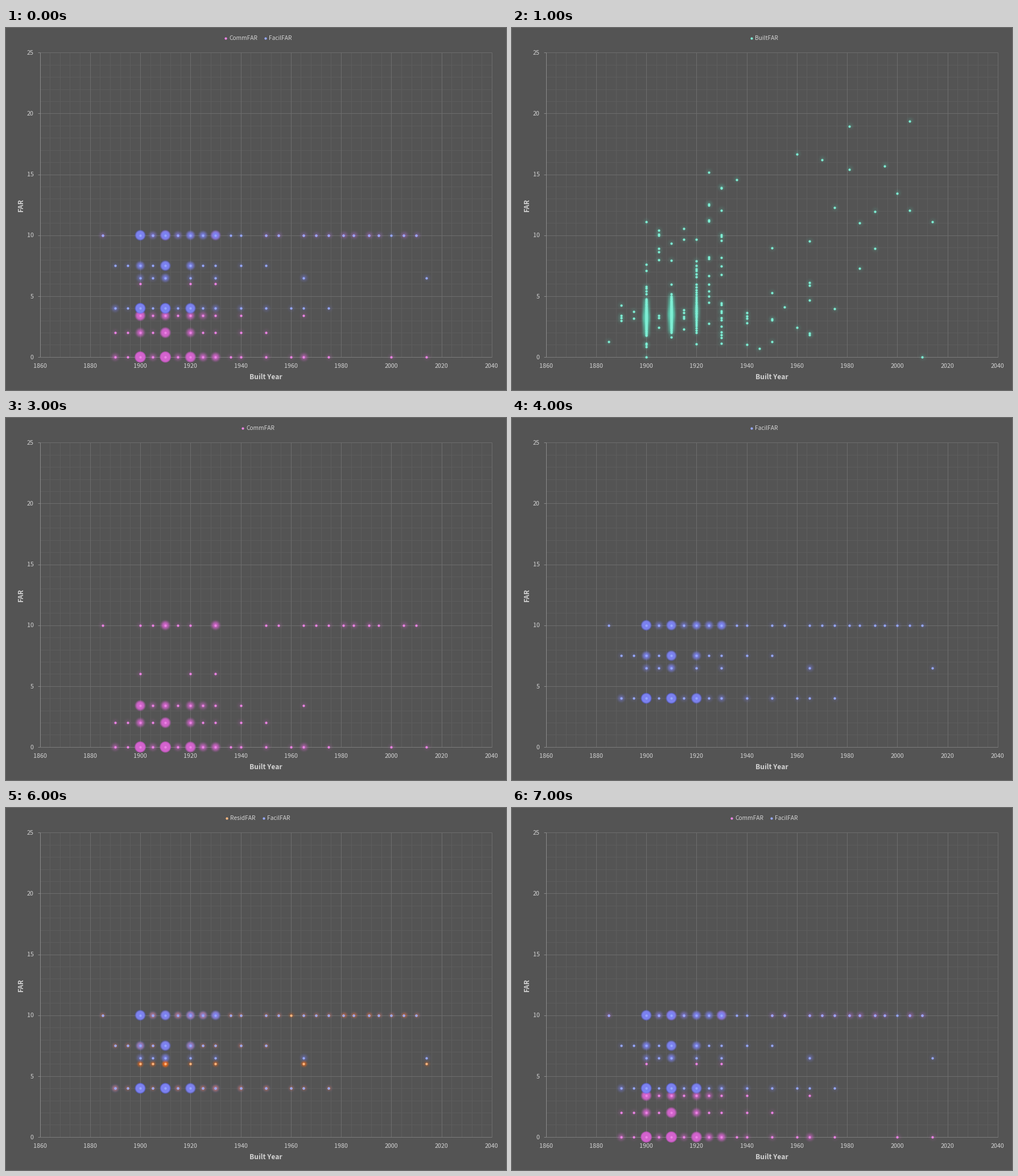
Recreate the animation shown at these times as a matplotlib script. Size 879 by 637 pixels, loop 8 s.

```python
import numpy as np
import matplotlib.pyplot as plt
from matplotlib.animation import FuncAnimation

W, H, DPI = 879, 637, 100
BACK, MINOR, MAJOR, AXIS, INK = "#545454", "#5d5d5d", "#6d6d6d", "#8a8a8a", "#d2d2d2"
plt.rcParams["font.family"] = ["Noto Sans CJK JP", "Liberation Sans"]


def px(year):
    return 59.5 + (year - 1860) * 4.413


def py(far):
    return 578.9 - far * 21.42


# Floor area ratio -> {year: number of lots}
LATE = {y: 1 for y in (1950, 1955, 1965, 1970, 1975, 1981, 1985, 1991, 1995, 2005, 2010)}
BUSY = {1981: 2, 1985: 2, 1991: 2, 2005: 2}

comm = {
    0: {1890: 4, 1895: 1, 1900: 150, 1905: 4, 1910: 150, 1915: 4, 1920: 70, 1925: 9, 1930: 13,
        1936: 1, 1940: 2, 1950: 2, 1960: 1, 1965: 5, 1975: 1, 2000: 1, 2014: 1},
    2: {1890: 1, 1895: 1, 1900: 12, 1905: 1, 1910: 50, 1920: 11, 1925: 1, 1930: 1, 1940: 1, 1950: 1},
    3.4: {1900: 40, 1905: 3, 1910: 15, 1915: 2, 1920: 10, 1925: 5, 1930: 2, 1940: 1, 1965: 1},
    6: {1900: 1, 1920: 1, 1930: 1},
    10: {1885: 1, 1900: 1, 1905: 1, 1910: 15, 1915: 1, 1920: 1, 1930: 12, **LATE, **BUSY},
}
facil = {
    4: {1890: 4, 1895: 1, 1900: 130, 1905: 1, 1910: 130, 1915: 2, 1920: 80, 1925: 2, 1930: 4,
        1940: 2, 1950: 2, 1960: 1, 1965: 1, 1975: 1},
    6.5: {1900: 4, 1905: 2, 1910: 10, 1920: 2, 1930: 2, 1965: 3, 2014: 1},
    7.5: {1890: 1, 1895: 1, 1900: 13, 1905: 1, 1910: 60, 1920: 13, 1925: 1, 1930: 1, 1940: 1, 1950: 1},
    10: {1885: 1, 1900: 80, 1905: 5, 1910: 50, 1915: 5, 1920: 16, 1925: 10, 1930: 22,
         1936: 1, 1940: 1, 2000: 1, **LATE},
}
resid = {
    4: {1890: 3, 1895: 1, 1900: 20, 1905: 1, 1910: 20, 1915: 2, 1920: 15, 1925: 2, 1930: 4,
        1940: 2, 1950: 2, 1960: 1, 1965: 1, 1975: 1},
    6: {1900: 3, 1905: 2, 1910: 7, 1920: 1, 1930: 2, 1965: 3, 2014: 1},
    7.5: {1890: 1, 1895: 1, 1900: 8, 1905: 1, 1910: 14, 1920: 7, 1925: 1, 1930: 1, 1940: 1, 1950: 1},
    10: {1885: 1, 1900: 16, 1905: 4, 1910: 16, 1915: 4, 1920: 12, 1925: 8, 1930: 6,
         1936: 1, 1940: 1, 1960: 1, 2000: 1, **LATE, **BUSY},
}

# Year -> built ratios
early = {
    1885: [1.25], 1890: [4.25, 3.4, 3.2, 3.0], 1895: [3.75, 3.15],
    1900: [11.1, 7.6, 7.1, 5.8, 5.65, 5.4, 5.2, 1.1, 1.0, 0.85, 0],
    1905: [10.42, 10.1, 10.0, 8.9, 8.65, 8.0, 3.4, 3.2, 2.4],
    1910: [9.35, 7.95, 5.95, 5.2, 1.65],
    1915: [10.55, 9.65, 3.85, 3.65, 3.3, 3.15, 2.3],
    1920: [9.65, 7.9, 7.5, 7.25, 7.1, 6.8, 6.57, 5.95, 5.75, 1.05],
    1925: [15.15, 12.55, 12.45, 11.25, 11.15, 8.2, 8.05, 6.65, 5.95, 5.4, 5.0, 4.5, 2.75],
    1930: [13.92, 13.88, 12.05, 10.05, 9.9, 9.55, 8.17, 7.48, 6.77, 4.45, 4.3, 3.8, 3.65,
           3.2, 3.05, 2.5, 2.05, 1.83, 1.6, 1.1],
}
late = {
    1936: [14.55], 1940: [3.65, 3.35, 3.15, 2.8, 1.0], 1945: [0.68],
    1950: [8.95, 5.28, 3.1, 3.05, 1.25], 1955: [4.12], 1960: [16.65, 2.4],
    1965: [9.5, 6.12, 5.9, 4.68, 1.95, 1.8], 1970: [16.2], 1975: [12.25, 3.95],
    1981: [18.93, 15.42], 1985: [11.0, 7.28], 1991: [11.95, 8.9], 1995: [15.7],
    2000: [13.43], 2005: [19.37, 12.02], 2010: [0], 2014: [11.1],
}


def column(year, mid, spread, n):
    u = np.linspace(-1, 1, n)
    return [(year, mid + spread * (0.55 * a + 0.45 * a ** 3), 1) for a in u]


def lots(table):
    return [(y, far, n) for far, row in table.items() for y, n in row.items()]


built = [(y, far, 1) for t in (early, late) for y, row in t.items() for far in row]
built += column(1900, 3.25, 1.5, 75) + column(1910, 3.5, 1.5, 85) + column(1920, 3.75, 1.75, 32)

# name: points, dot, glow, rim, glow strength, glow radius, tooth depth
SERIES = {
    "BuiltFAR": (built, (126, 238, 212), (92, 212, 183), (92, 212, 183), 0.24, 10.5, 0),
    "ResidFAR": (lots(resid), (255, 184, 128), (255, 106, 16), (255, 106, 16), 0.50, 8.2, 0),
    "CommFAR": (lots(comm), (236, 132, 228), (212, 100, 206), (224, 84, 220), 0.25, 10.8, 0.03),
    "FacilFAR": (lots(facil), (150, 168, 255), (124, 130, 242), (84, 96, 250), 0.25, 10.5, 0.01),
}


def glow_layer(points, glow, rim, power, radius, tooth):
    rgb, alpha = np.zeros((H, W, 3)), np.zeros((H, W, 1))
    glow, rim = np.array(glow) / 255, np.array(rim) / 255
    for year, far, n in points:
        cx, cy = px(year), py(far)
        x0, y0 = int(cx) - 12, int(cy) - 12
        yy, xx = np.mgrid[y0:y0 + 25, x0:x0 + 25] + 0.5
        r = np.hypot(xx - cx, yy - cy)
        r = r * (1 + tooth * np.cos(24 * np.arctan2(yy - cy, xx - cx)))
        one = power * np.clip(1 - r / radius, 0, 1) ** 2
        a = (1 - (1 - one) ** n)[..., None]
        mix = np.clip((r - 7.6) / 1.4, 0, 1)[..., None]
        box = np.s_[y0:y0 + 25, x0:x0 + 25]
        rgb[box] = (glow * (1 - mix) + rim * mix) * a + rgb[box] * (1 - a)
        alpha[box] = a + alpha[box] * (1 - a)
    return np.dstack([rgb / np.maximum(alpha, 1e-6), alpha]).clip(0, 1)


# The small margin keeps the pixel size from rounding down
fig = plt.figure(figsize=((W + 0.01) / DPI, (H + 0.01) / DPI), dpi=DPI, facecolor=BACK)
ax = fig.add_axes([0, 0, 1, 1])
ax.axis("off")


def label(x, y, s, size, **kw):
    return ax.text(x, y, s, fontsize=size * 72 / DPI, color=INK, va="baseline", zorder=20, **kw)


def line(x, y, color, z):
    ax.plot(x, y, color=color, lw=0.72, zorder=z, solid_capstyle="butt")


left, right, top, bottom = px(1860), px(2040), py(25), py(0)
for year in range(1860, 2041, 4):
    major = year % 20 == 0
    line([px(year)] * 2, [top, bottom], MAJOR if major else MINOR, 1 + major)
for far in range(26):
    major = far % 5 == 0
    line([left, right], [py(far)] * 2, MAJOR if major else MINOR, 1 + major)
    if major:
        line([left - 4, left], [py(far)] * 2, AXIS, 3)
        label(48.5, py(far) + 3.7, str(far), 10.7, ha="right")
for year in range(1860, 2041, 20):
    label(px(year), 598, str(year), 10.7, ha="center")
line([left, left], [top, bottom], AXIS, 3)
line([left, right], [bottom, bottom], "#7c7c7c", 3)
label(456.5, 618, "Built Year", 12.1, ha="center", weight="bold")
label(29.5, 311, "FAR", 12.1, ha="center", weight="bold", rotation=90, rotation_mode="anchor")


def dots(x, y, color, z):
    return ax.scatter(x, y, s=(4.2 * 72 / DPI) ** 2, color=[np.array(color) / 255], lw=0, zorder=z)


layers = {}
for i, (name, (pts, dot, glow, rim, power, radius, tooth)) in enumerate(SERIES.items()):
    img = ax.imshow(glow_layer(pts, glow, rim, power, radius, tooth), extent=(0, W, H, 0),
                    aspect="auto", interpolation="nearest", zorder=4 + 2 * i)
    xs, ys, _ = zip(*pts)
    marks = dots(px(np.array(xs)), py(np.array(ys)), dot, 5 + 2 * i)
    layers[name] = [img, marks]
ax.set_xlim(0, W)
ax.set_ylim(H, 0)

B, R, C, F = SERIES
# Series on show and the x of each legend dot, one scene per second
SCENES = [
    ((C, F), (386, 456)),
    ((B,), (420.5,)),
    ((B, R, C, F), (321.5, 383.3, 449, 520)),
    ((C,), (416,)),
    ((F,), (420.5,)),
    ((R, C), (383.8, 448.3)),
    ((R, F), (388.3, 453)),
    ((C, F), (386, 456)),
]
legends = []
for names, places in SCENES:
    items = []
    for name, x in zip(names, places):
        items += [dots([x], [17.7], SERIES[name][1], 20), label(x + 6, 21.4, name, 10.2)]
    legends.append(items)


def draw(i):
    shown = SCENES[i][0]
    for name, parts in layers.items():
        for p in parts:
            p.set_visible(name in shown)
    for k, items in enumerate(legends):
        for p in items:
            p.set_visible(k == i)
    return []


anim = FuncAnimation(fig, draw, frames=len(SCENES), interval=1000, repeat=True, repeat_delay=0)
plt.show()
```
